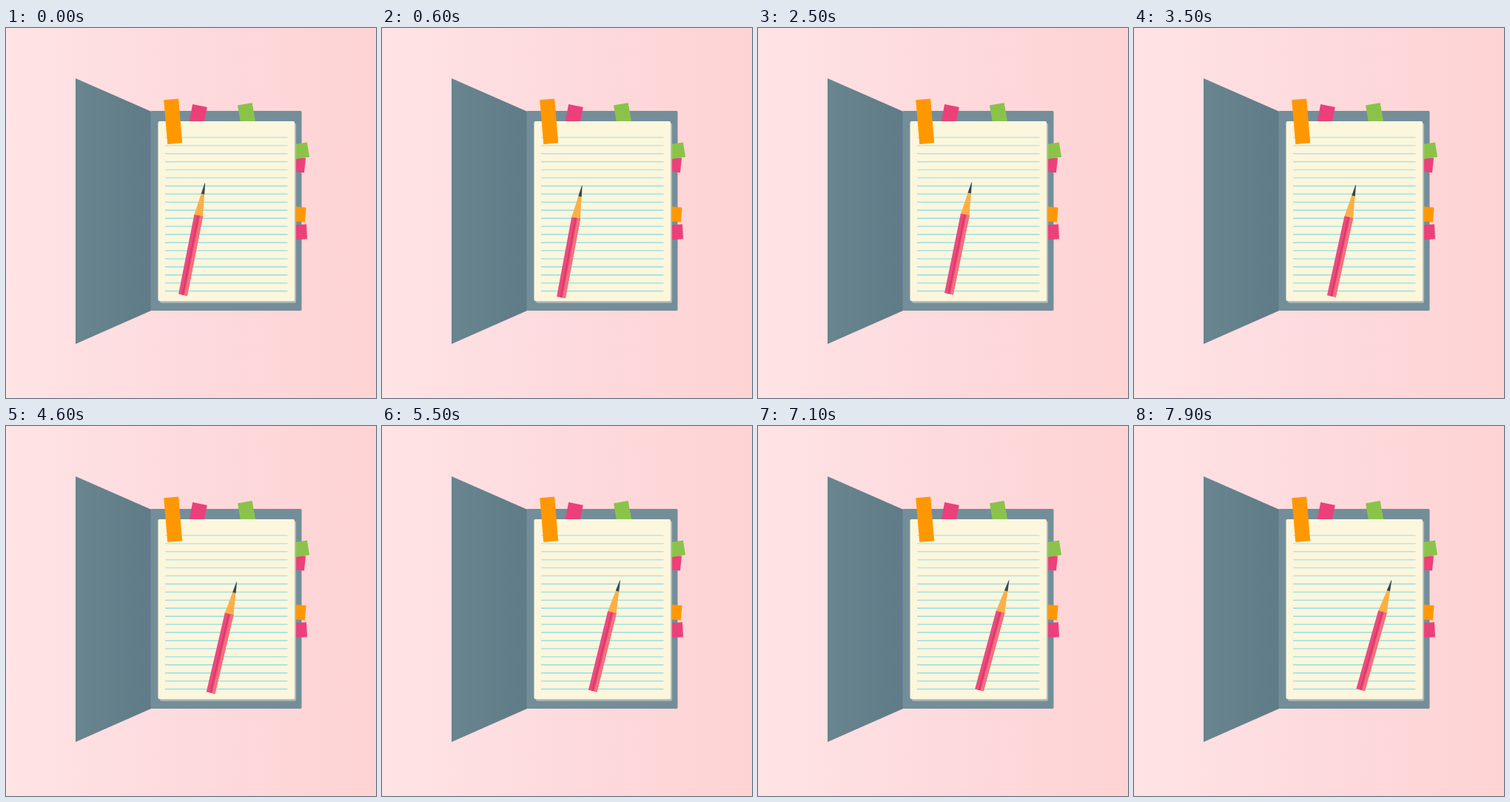
These frames come from a looping animation (500x500 px, 8000 ms). An HTML page with a canvas:

```html
<!DOCTYPE html>
<html lang="en">
<head>
<meta charset="utf-8">
<title>Notebook and pencil</title>
<style>
html, body { margin: 0; width: 100%; height: 100%; overflow: hidden; background: #fddcde; }
canvas { display: block; width: 100vmin; height: 100vmin; }
</style>
</head>
<body>
<canvas id="stage"></canvas>
<script>
const SIZE = 500, LOOP = 8000, STEP = 100, EASE = 1.36;
const PINK = '#ec407a', GREEN = '#8bc34a', ORANGE = '#ff9800';
const canvas = document.getElementById('stage');
const ctx = canvas.getContext('2d');
const scale = window.devicePixelRatio || 1;
canvas.width = canvas.height = SIZE * scale;

function box(fill, x, y, w, h, r = 0) {
  ctx.fillStyle = fill;
  ctx.beginPath();
  ctx.roundRect(x, y, w, h, r);
  ctx.fill();
}

function at(x, y, degrees, paint) {
  ctx.save();
  ctx.translate(x, y);
  ctx.rotate(degrees * Math.PI / 180);
  paint();
  ctx.restore();
}

function fade(x0, x1, ...colors) {
  const g = ctx.createLinearGradient(x0, 0, x1, 0);
  colors.forEach((c, i) => g.addColorStop(i / (colors.length - 1), c));
  return g;
}

// Sticky strip hanging from the middle of its outer edge.
function strip(color, x, y, degrees, length = 20) {
  at(x, y, degrees, () => box(color, -10, 0, 20, length));
}

// Trapezoid with its parallel sides of half-width a and b.
function taper(color, y0, a, y1, b) {
  ctx.fillStyle = color;
  ctx.beginPath();
  ctx.moveTo(-a, y0);
  ctx.lineTo(a, y0);
  ctx.lineTo(b, y1);
  ctx.lineTo(-b, y1);
  ctx.fill();
}

function drawCover() {
  box(fade(0, SIZE, '#ffe4e5', '#fddadd', '#fed3d4'), 0, 0, SIZE, SIZE);
  const flap = fade(94, 196, '#69858f', '#5f7b87');
  // The open flap mirrors about the middle of the book.
  at(0, 247.4, 0, () => {
    ctx.fillStyle = flap;
    ctx.beginPath();
    ctx.moveTo(94, -179.5);
    ctx.lineTo(196, -134.7);
    ctx.lineTo(196, 134.7);
    ctx.lineTo(94, 179.5);
    ctx.fill();
  });
  box('#738e99', 195.5, 112, 204, 270, 1.5);
}

function drawPage() {
  strip(PINK, 262, 105, 11, 26);
  strip(GREEN, 322.8, 102.8, -10, 26);
  strip(PINK, 404, 185.6, 96);
  strip(GREEN, 408.5, 164.3, 81);
  strip(ORANGE, 404.7, 252.5, 95);
  strip(PINK, 406.5, 275.3, 87);

  box('#b5bdb9', 208, 128.5, 184, 243, 2);
  box('#fcf6dd', 205.5, 126, 184.5, 243, 2);
  for (let i = 0; i < 20; i++) {
    box(i < 6 ? '#aee5e2' : '#93e0e5', 215, 147.2 + i * 10.93, 165.5, 1.4);
  }
  strip(ORANGE, 223.2, 96.3, -4.8, 60);
}

// Tip at the local origin, tail straight down.
function drawPencil() {
  taper('#fbb047', 14, 2.1, 46, 6.1);
  taper('#37474f', 0, 0.3, 15, 2.3);
  box('#ec4a7d', -6, 44.5, 12, 109.5);
  box('#d93a68', -1.3, 44.5, 2, 109.5);
  box('#f4717c', 2, 44.5, 4, 109.5);
}

function draw(ms) {
  const t = Math.floor((ms % LOOP) / STEP) * STEP / 1000;
  // Eases in, then glides at a steady rate.
  const left = Math.max(0, 1 - t / EASE);
  const s = t + EASE / 2 * left * left;
  const bob = -2.5 * Math.cos(2 * Math.PI * (1.29 * t - 3.175));
  const lean = 9.65 + 0.77 * s + left * left;

  ctx.setTransform(scale, 0, 0, scale, 0, 0);
  drawCover();
  drawPage();
  at(261.4 + 10.95 * s, 210.8 + bob, lean, drawPencil);
}

const start = performance.now();
function tick() {
  draw(performance.now() - start);
  requestAnimationFrame(tick);
}
tick();
</script>
</body>
</html>
```
